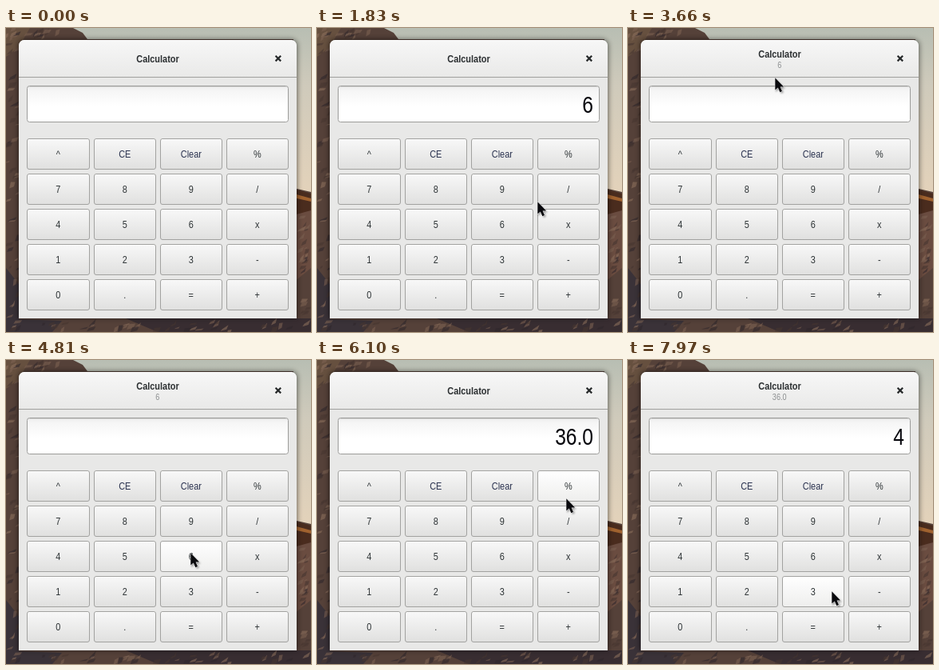
Animation, 382 px wide and 380 px high, one loop 8000 ms. Source, as an HTML page:

```html
<!DOCTYPE html>
<html lang="en">
<head>
<meta charset="utf-8">
<title>Calculator</title>
<style>
html, body { margin: 0; width: 100%; height: 100%; overflow: hidden; background: #56433c; }
svg { display: block; width: 382px; height: 380px; }
text { font: 13.33px "Liberation Sans", Arial, sans-serif; fill: #2e3436; text-anchor: middle; }
#title { font-weight: bold; fill: #2b2f31; }
#sub { font-size: 11.1px; fill: #8b8e8f; }
#value { font-size: 30px; fill: #06060c; text-anchor: end; }
.key rect { fill: url(#normal); stroke: #a2a2a0; }
.key.hover rect { fill: url(#hover); }
.key.press rect { fill: url(#press); stroke: #8f8f8d; }
.key .word { fill: #2b3350; }
</style>
</head>
<body>
<svg viewBox="0 0 382 380">
  <defs>
    <linearGradient id="sky" x2="0" y2="1">
      <stop stop-color="#b8beb3"/><stop offset=".35" stop-color="#cfcabb"/><stop offset="1" stop-color="#e3d2ba"/>
    </linearGradient>
    <linearGradient id="head" x2="0" y2="1">
      <stop stop-color="#f7f7f7"/><stop offset="1" stop-color="#e9e9e8"/>
    </linearGradient>
    <linearGradient id="entry" x2="0" y2="1">
      <stop stop-color="#ececec"/><stop offset=".14" stop-color="#f6f6f6"/><stop offset=".55" stop-color="#fff"/>
    </linearGradient>
    <linearGradient id="normal" x2="0" y2="1">
      <stop stop-color="#f8f8f8"/><stop offset="1" stop-color="#e0e0df"/>
    </linearGradient>
    <linearGradient id="hover" x2="0" y2="1">
      <stop stop-color="#fff"/><stop offset="1" stop-color="#eeeeed"/>
    </linearGradient>
    <linearGradient id="press" x2="0" y2="1">
      <stop stop-color="#c6c6c5"/><stop offset="1" stop-color="#dcdcdb"/>
    </linearGradient>
    <filter id="blur" x="-20%" y="-20%" width="140%" height="140%"><feGaussianBlur stdDeviation="3"/></filter>
    <filter id="soft" x="-50%" y="-50%" width="200%" height="200%"><feGaussianBlur stdDeviation="1"/></filter>
  </defs>

  <!-- rocky backdrop -->
  <rect width="382" height="380" fill="#554139"/>
  <path d="M84 0H382V205L360 200V14H102L96 6Z" fill="url(#sky)"/>
  <path d="M0 0H30L16 24L0 36Z" fill="#66503f"/>
  <path d="M360 201L382 207V240L360 232Z" fill="#4a2c1e"/>
  <path d="M360 207L382 213V217L360 212Z" fill="#a0622f"/>
  <path d="M360 234L382 228V300L360 318Z" fill="#6a4c40"/>
  <path d="M0 300L16 320V364L70 366L58 380H0Z" fill="#3a3238"/>
  <path d="M150 363H382V380H190Z" fill="#382d31"/>
  <g id="shards"></g>

  <!-- window -->
  <path d="M15 363V22a8 8 0 0 1 8-8H357a8 8 0 0 1 8 8V363Z" fill="#000" opacity=".5" filter="url(#blur)"/>
  <path d="M16 363V22a7 7 0 0 1 7-7H357a7 7 0 0 1 7 7V363Z" fill="#e8e8e7"/>
  <path d="M16 61V22a7 7 0 0 1 7-7H357a7 7 0 0 1 7 7V61Z" fill="url(#head)"/>
  <path d="M22 15.5H358" stroke="#fff"/>
  <path d="M16 61.5H364" stroke="#a0a09e"/>
  <path d="M337.6 34.8L344.2 41.4M344.2 34.8L337.6 41.4" stroke="#26292a" stroke-width="2.2"/>
  <rect x="26.5" y="72.5" width="327" height="45" rx="3" fill="url(#entry)" stroke="#9c9c9a"/>
  <path d="M28 73.5H352" stroke="#d4d4d3"/>
  <text id="title"></text>
  <text id="sub"></text>
  <text id="value"></text>
  <g id="keys"></g>

  <g id="cursor">
    <path d="M1 2V18L5 14.5L8 20L11 18.5L8.5 13.5H13Z" opacity=".35" filter="url(#soft)"/>
    <path d="M.3 .3V15.6L3.8 12.5L6.3 18.2L9 17L6.6 11.4H11.2Z" fill="#0a0a0e" stroke="#fff" stroke-width=".9" stroke-linejoin="round" paint-order="stroke"/>
  </g>
</svg>
<script>
const LOOP = 8000, CONDENSED = 0.82;
const $ = id => document.getElementById(id);

function make(tag, attrs, parent) {
  const el = document.createElementNS("http://www.w3.org/2000/svg", tag);
  for (const name in attrs) el.setAttribute(name, attrs[name]);
  parent.append(el);
  return el;
}
function put(el, x, y) {
  el.setAttribute("transform", `translate(${x} ${y}) scale(${CONDENSED} 1)`);
}
function write(el, text) {
  if (el.textContent !== text) el.textContent = text;
}

// rock texture around the window
let seed = 11;
const rand = () => (seed = (seed * 16807) % 2147483647) / 2147483647;
const tones = ["#2e272c", "#7b6152", "#463630", "#8a6e5b"];
function shard(x, y) {
  const w = 3 + rand() * 6, h = 2 + rand() * 5;
  make("path", {
    d: `M${x} ${y}l${w} ${-h * rand()}l${-w * 0.3} ${h}l${-w} ${h * 0.4}Z`,
    fill: tones[Math.floor(rand() * 4)], opacity: 0.6
  }, $("shards"));
}
for (let i = 0; i < 45; i++) shard(rand() * 14, rand() * 375);
for (let i = 0; i < 14; i++) shard(rand() * 74, 2 + rand() * 10);
for (let i = 0; i < 40; i++) shard(rand() * 378, 367 + rand() * 11);
for (let i = 0; i < 22; i++) shard(366 + rand() * 12, 226 + rand() * 145);

// keypad
const columns = [26, 110, 193, 276];
const keys = ["^", "CE", "Clear", "%", "7", "8", "9", "/", "4", "5", "6", "x",
  "1", "2", "3", "-", "0", ".", "=", "+"].map((label, i) => {
  const x = columns[i % 4], y = 138 + 44 * Math.floor(i / 4), w = i % 4 ? 78 : 79;
  const el = make("g", { class: "key" }, $("keys"));
  make("rect", { x: x + 0.5, y: y + 0.5, width: w - 1, height: 38, rx: 2.5 }, el);
  make("path", { d: `M${x + 2} ${y + 1.5}h${w - 4}`, stroke: "#fff", opacity: 0.6 }, el);
  const text = make("text", label.length > 1 ? { class: "word" } : {}, el);
  text.textContent = label;
  put(text, x + w / 2 - 0.2, y + 23.5);
  return { label, x, y, w, el };
});

// pointer: time, x, y
const path = [
  [350, 335, 101], [590, 202, 57], [850, 202, 57], [1500, 229, 234], [1670, 229, 234],
  [1830, 276, 217], [2150, 305, 196], [2380, 305, 196], [2720, 191, 47],
  [3080, 338, 261], [3230, 338, 261], [3660, 184, 62], [3960, 164, 49], [4160, 170, 40],
  [4640, 232, 249], [4780, 231, 241], [4960, 231, 241], [5490, 240, 335],
  [5690, 240, 335], [6100, 312, 173], [6360, 310, 200], [6530, 310, 200],
  [7080, 70, 278], [7240, 57, 264], [7280, 57, 264], [7360, 59, 240],
  [7620, 59, 240], [7970, 255, 289], [8000, 255, 289]
];
// key presses: down, up, label
const presses = [
  [1550, 1630, "6"], [3190, 3260, "x"], [4850, 4930, "6"],
  [5620, 5690, "="], [6450, 6520, "/"], [7510, 7590, "4"]
];
// from time: display, subtitle
const states = [
  [0, "", ""], [1630, "6", ""], [3260, "", "6"], [4930, "6", "6"],
  [5690, "36.0", ""], [6520, "", "36.0"], [7590, "4", "36.0"]
];

// velocity at a point, zero beside a rest
function slope(i, axis) {
  const a = path[i - 1], b = path[i], c = path[i + 1];
  if (!a || !c) return 0;
  const rests = p => p[1] === b[1] && p[2] === b[2];
  return rests(a) || rests(c) ? 0 : (c[axis] - a[axis]) / (c[0] - a[0]);
}
function pointer(t) {
  const i = Math.min(path.findLastIndex(p => p[0] <= t), path.length - 2);
  const a = path[i], b = path[i + 1], d = b[0] - a[0], u = (t - a[0]) / d;
  const k = u * u * (3 - 2 * u);
  return [1, 2].map(n => a[n] + (b[n] - a[n]) * k +
    d * u * (1 - u) * ((1 - u) * slope(i, n) - u * slope(i + 1, n)));
}

function draw(t) {
  const [, value, sub] = states.findLast(s => s[0] <= t);
  write($("title"), "Calculator");
  write($("sub"), sub);
  write($("value"), value);
  put($("title"), 190, sub ? 37 : 43);
  put($("sub"), 189.7, 50);
  put($("value"), 346, 105.5);

  const shown = t >= path[0][0];
  const [x, y] = shown ? pointer(t) : [-50, -50];
  $("cursor").setAttribute("transform", `translate(${Math.round(x)} ${Math.round(y)})`);
  const down = presses.find(p => t >= p[0] && t < p[1]);
  for (const key of keys) {
    const over = x > key.x + 0.5 && x < key.x + key.w && y > key.y && y < key.y + 39;
    const state = down && down[2] === key.label ? "press" : over ? "hover" : "";
    key.el.setAttribute("class", `key ${state}`);
  }
}

const start = performance.now();
function tick() {
  draw((performance.now() - start) % LOOP);
  requestAnimationFrame(tick);
}
tick();
</script>
</body>
</html>
```
